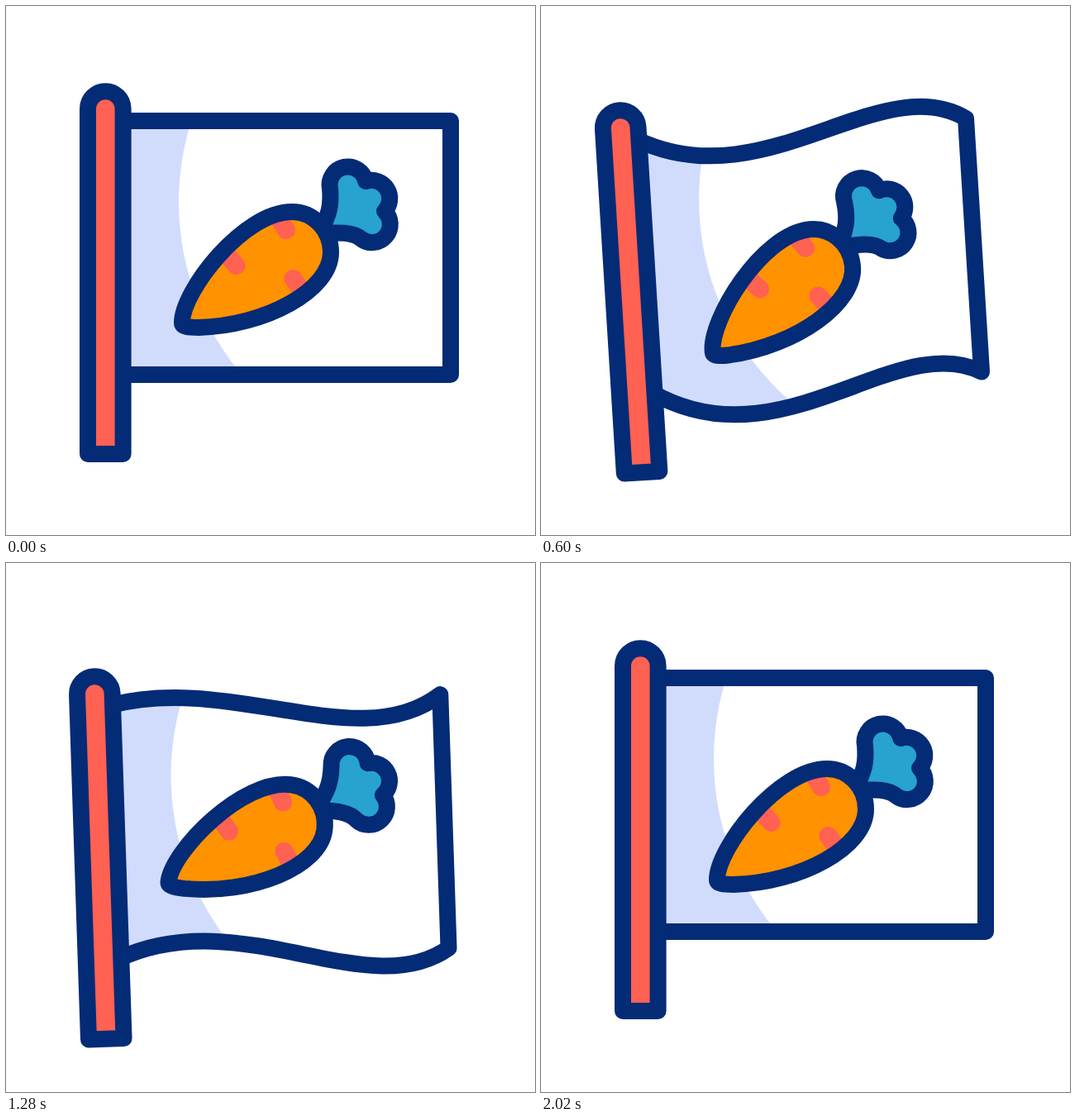
Recreate the animation shown at these times as an HTML page with a canvas. Size 640x640 px, loop 2400 ms.

```html
<!DOCTYPE html>
<html lang="en">
<head>
<meta charset="utf-8">
<title>Carrot flag</title>
<style>
html, body { margin: 0; width: 100%; height: 100%; overflow: hidden; background: #fff; }
canvas { display: block; width: 640px; height: 640px; }
</style>
</head>
<body>
<canvas id="stage" width="640" height="640"></canvas>
<script>
const ctx = document.getElementById('stage').getContext('2d');
const LOOP = 2400, STEP = 20;
const NAVY = '#042b76', CORAL = '#ff6152', ORANGE = '#ff9200', TEAL = '#28a2ce', SHADE = '#d1dcfd';
const PIVOT = { x: 120, y: 513 };
const CARROT = { x: 308, y: 322 };
const rad = deg => deg * Math.PI / 180;

// Keys are [time, value, snap]; snap sharpens the turn at that key.
// The flag and carrot share one rhythm.
const wave = (a, b) => [[0, 0], [600, a], [1400, b], [2000, 0]];
const KEYS = {
  bob: [[0, 0], [480, 54], [780, -36], [1156, 54], [1520, -21], [2020, 0]],
  tilt: [[0, 0], [400, -7.9], [970, 9.3, 0.38], [1420, -4.8], [1930, 0]],
  top1: wave(85, -42),
  top2: wave(-68, 81),
  low1: wave(99, -75),
  low2: wave(-58, 74),
  carrotX: wave(-1.5, -3),
  carrotY: wave(14, -15.3),
  carrotTurn: wave(-3, 9.5)
};

function ease(s, snapIn, snapOut) {
  const r = 1 - s;
  return s * s * (3 - 2 * s) + snapIn * s * r * r - snapOut * s * s * r;
}

function valueAt(keys, t) {
  for (let i = 1; i < keys.length; i++) {
    const [t0, v0, snap0 = 0] = keys[i - 1], [t1, v1, snap1 = 0] = keys[i];
    if (t < t1) return v0 + (v1 - v0) * ease((t - t0) / (t1 - t0), snap0, snap1);
  }
  return keys[keys.length - 1][1];
}

const pole = new Path2D('M99 542V124.5A21.3 21.3 0 0 1 141.6 124.5V542Z');
const leaf = new Path2D('M380 275C390 252 394 244 392 221A22 22 0 0 1 435.2 212' +
  'A22 22 0 0 1 458 248.2A22 22 0 0 1 430 282C420 273 402 274 380 275Z');
const body = new Path2D('M213 383C213 345 287 249 346 249C372 249 393 271 393 298' +
  'C393 344 314 387 233 389C220 389 213 388 213 383Z');
const marks = new Path2D('M267 301L278.5 314M332 260L339 271M357 343L347.5 330');

function outlined(path, fill) {
  ctx.fillStyle = fill;
  ctx.fill(path);
  ctx.stroke(path);
}

function drawFlag(p) {
  const left = 138, right = 538, top = 139, low = 446;
  const near = left + 150, far = left + 300;
  const flag = new Path2D();
  flag.moveTo(left, top);
  flag.bezierCurveTo(near, top + p.top1, far, top + p.top2, right, top);
  flag.lineTo(right, low);
  flag.bezierCurveTo(far, low + p.low2, near, low + p.low1, left, low);
  flag.closePath();

  ctx.save();
  ctx.clip(flag);
  ctx.fillStyle = SHADE;
  ctx.fillRect(100, 60, 240, 480);
  ctx.fillStyle = '#fff';
  ctx.beginPath();
  ctx.arc(534, 237, 325, 0, 2 * Math.PI);
  ctx.fill();
  ctx.restore();
  ctx.stroke(flag);
}

function drawCarrot(p) {
  ctx.save();
  ctx.translate(CARROT.x + p.carrotX, CARROT.y + p.carrotY);
  ctx.rotate(rad(p.carrotTurn));
  ctx.translate(-CARROT.x, -CARROT.y);
  outlined(leaf, TEAL);
  ctx.fillStyle = ORANGE;
  ctx.fill(body);
  ctx.save();
  ctx.strokeStyle = CORAL;
  ctx.lineWidth = 22;
  ctx.stroke(marks);
  ctx.restore();
  ctx.stroke(body);
  ctx.restore();
}

function draw(t) {
  const p = {};
  for (const name in KEYS) p[name] = valueAt(KEYS[name], t);

  ctx.fillStyle = '#fff';
  ctx.fillRect(0, 0, 640, 640);
  ctx.save();
  ctx.translate(PIVOT.x, PIVOT.y + p.bob);
  ctx.rotate(rad(p.tilt));
  ctx.translate(-PIVOT.x, -PIVOT.y);
  ctx.strokeStyle = NAVY;
  ctx.lineWidth = 20;
  ctx.lineJoin = ctx.lineCap = 'round';
  drawFlag(p);
  drawCarrot(p);
  outlined(pole, CORAL);
  ctx.restore();
}

const start = performance.now();
function tick() {
  const t = (performance.now() - start) % LOOP;
  draw(Math.floor(t / STEP) * STEP);
  requestAnimationFrame(tick);
}
tick();
</script>
</body>
</html>
```
